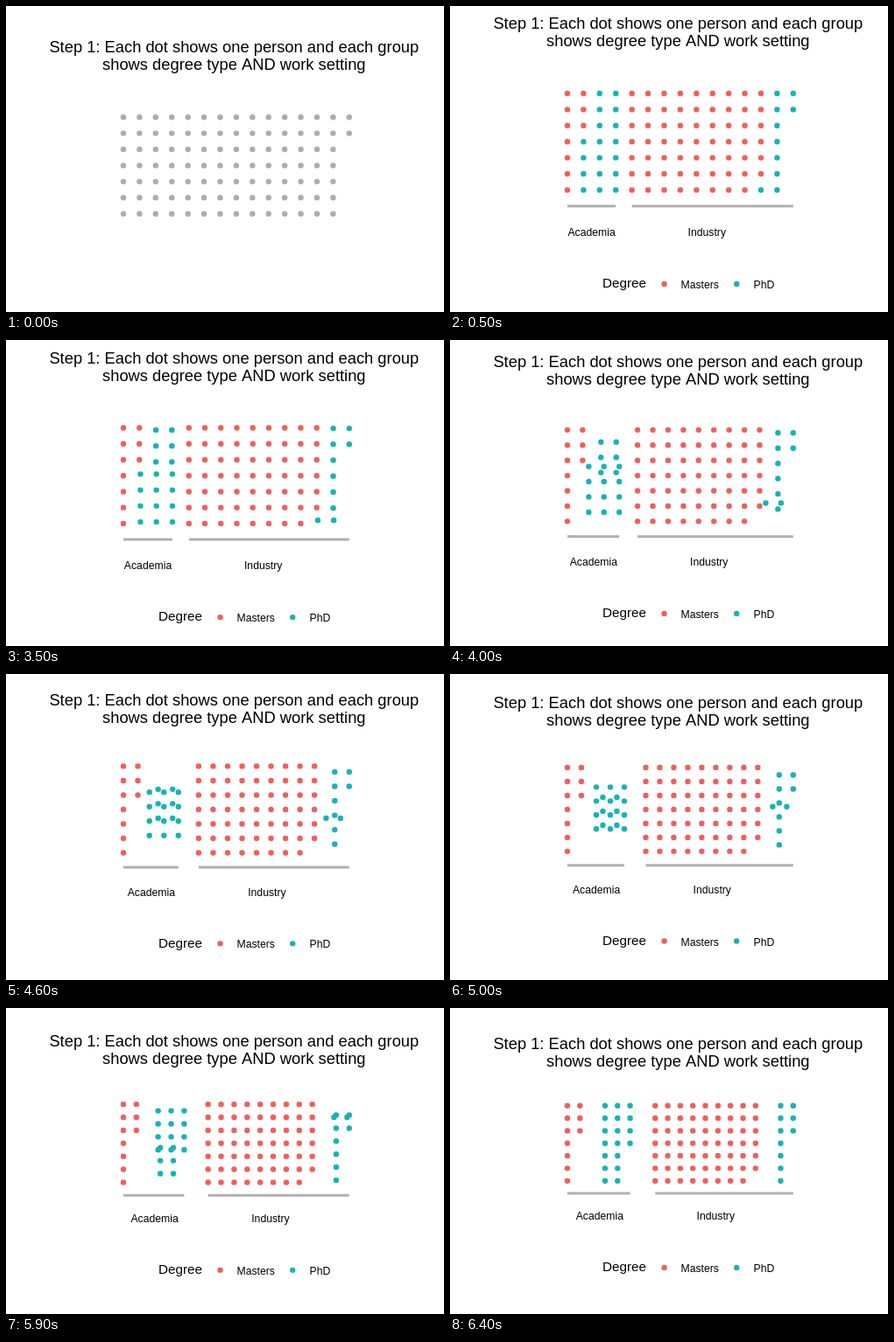
Animation, 500 px wide and 350 px high, one loop 8000 ms. Source, as an HTML page with a canvas:

```html
<!DOCTYPE html>
<html lang="en">
<head>
<meta charset="utf-8">
<title>Degree and work setting</title>
<style>
html, body { margin: 0; width: 100%; height: 100%; overflow: hidden; background: #fff; }
canvas { display: block; }
</style>
</head>
<body>
<canvas id="stage" width="500" height="350"></canvas>
<script>
const ctx = document.getElementById('stage').getContext('2d');
const LOOP = 8000, STEP = 100, GROUPED = 500, SPLIT = 3400, SPLIT_STEPS = 30;
const ROWS = 7, LEFT = 134, WIDTH = 257.8, FULL = WIDTH / 14;
const RED = '#f15f5b', TEAL = '#17b3b7', GREY = '#adadad';

const lerp = (a, b, t) => a + (b - a) * t;

// Consecutive runs of dots; each fills columns top to bottom.
// start: first slot before the split, col: first column after it.
const runs = [
  { count: 10, start: 0, col: 0, color: RED },
  { count: 18, start: 10, col: 3, color: TEAL },
  { count: 62, start: 28, col: 7, color: RED },
  { count: 10, start: 90, col: 17, color: TEAL }
];
const dots = runs.flatMap(run => Array.from({ length: run.count }, (_, i) => {
  const slot = run.start + i;
  return {
    color: run.color,
    from: [Math.floor(slot / ROWS), slot % ROWS],
    to: [run.col + Math.floor(i / ROWS), i % ROWS]
  };
}));

// Columns of the bar ends and the mean column, before and after the split.
const settings = [
  { name: 'Academia', start: [0, 0], end: [3, 5], mean: [1.5, 2.57] },
  { name: 'Industry', start: [4, 7], end: [14, 18], mean: [8.65, 11.82] }
];

function text(str, x, y, size, align = 'left') {
  ctx.font = `${size}px "Liberation Sans", Arial, sans-serif`;
  ctx.textAlign = align;
  ctx.fillStyle = '#000';
  ctx.fillText(str, x, y);
}

function dot(x, y, color) {
  ctx.fillStyle = color;
  ctx.beginPath();
  ctx.arc(x, y, 3.2, 0, Math.PI * 2);
  ctx.fill();
}

function title(y) {
  text('Step 1: Each dot shows one person and each group', 260.3, y, 18.33, 'center');
  text('shows degree type AND work setting', 260.3, y + 20, 18.33, 'center');
}

function drawPlain() {
  title(52.5);
  for (const { from: [col, row] } of dots) dot(LEFT + col * FULL, 127.2 + row * FULL, GREY);
}

function drawGrouped(t) {
  // The plot keeps its width, so the spacing shrinks as columns are added.
  const gap = WIDTH / lerp(14, 18, t);
  const shrink = 5.12 * (FULL - gap);
  const px = col => LEFT + col * gap;
  const py = row => 153 + (row - 2.88) * gap;

  title(26.2 + shrink);
  for (const { from, to, color } of dots) {
    dot(px(lerp(from[0], to[0], t)), py(lerp(from[1], to[1], t)), color);
  }
  for (const { name, start, end, mean } of settings) {
    const x = px(lerp(...start, t));
    ctx.fillStyle = '#b0b0b0';
    ctx.fillRect(x, py(7) - 1.5, px(lerp(...end, t)) - x, 3);
    text(name, px(lerp(...mean, t)), 263.2 - shrink, 12.22, 'center');
  }

  const y = 318 - shrink;
  text('Degree', 174, y + 4.3, 15.28);
  dot(244.6, y, RED);
  text('Masters', 263.5, y + 5, 12.22);
  dot(327.2, y, TEAL);
  text('PhD', 346.5, y + 5, 12.22);
}

function frame() {
  const time = performance.now() % LOOP;
  ctx.fillStyle = '#fff';
  ctx.fillRect(0, 0, 500, 350);
  if (time < GROUPED) {
    drawPlain();
  } else {
    const step = Math.floor((time - SPLIT) / STEP);
    drawGrouped(Math.min(Math.max(step / SPLIT_STEPS, 0), 1));
  }
  requestAnimationFrame(frame);
}
frame();
</script>
</body>
</html>
```
